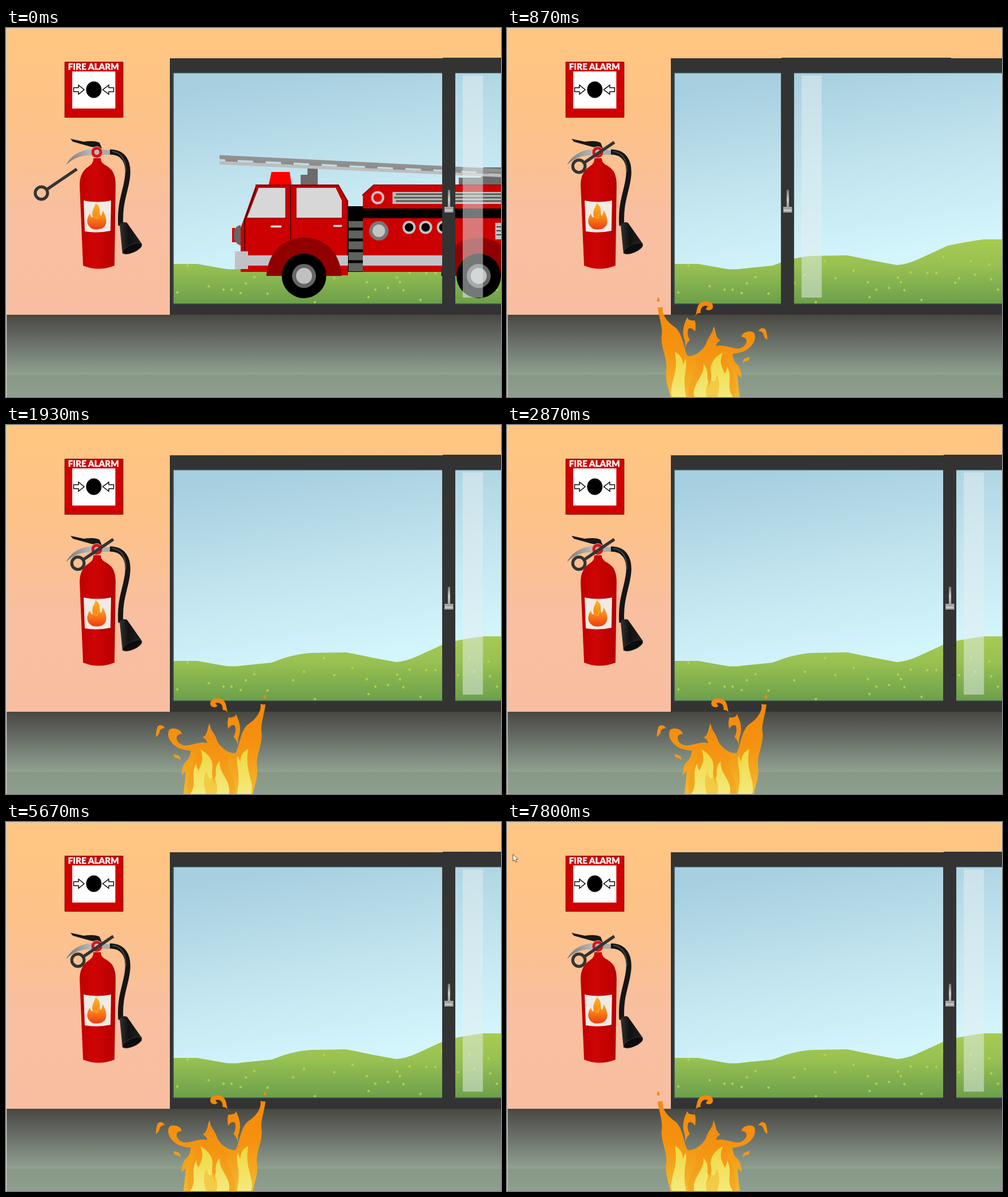
Recreate the animation shown at these times as an HTML page. Size 867 by 646 pixels, loop 8000 ms.

```html
<!DOCTYPE html>
<html lang="en">
<head>
<meta charset="utf-8">
<title>Fire alarm</title>
<style>
html, body { margin: 0; width: 100%; height: 100%; overflow: hidden; }
svg { display: block; width: 100vw; height: 100vh; }
</style>
</head>
<body>
<svg viewBox="0 0 867 646" preserveAspectRatio="none">
  <defs>
    <linearGradient id="wall" x2="0" y2="1">
      <stop offset="0" stop-color="#ffc681"/><stop offset=".32" stop-color="#fdc287"/>
      <stop offset=".65" stop-color="#f8bfa0"/><stop offset="1" stop-color="#f9bea1"/>
    </linearGradient>
    <linearGradient id="floor" x2="0" y2="1">
      <stop offset="0" stop-color="#484840"/><stop offset=".25" stop-color="#616560"/>
      <stop offset=".7" stop-color="#8c9d8c"/><stop offset=".72" stop-color="#91a291"/>
      <stop offset=".74" stop-color="#889887"/><stop offset="1" stop-color="#8f9f8f"/>
    </linearGradient>
    <linearGradient id="sky" gradientUnits="userSpaceOnUse" x1="550" y1="70" x2="610" y2="410">
      <stop offset="0" stop-color="#a7cfdf"/><stop offset=".5" stop-color="#c0e3ee"/><stop offset="1" stop-color="#d3f5fc"/>
    </linearGradient>
    <linearGradient id="grass" gradientUnits="userSpaceOnUse" x1="0" y1="370" x2="0" y2="483">
      <stop offset="0" stop-color="#a7cb52"/><stop offset=".4" stop-color="#98c152"/><stop offset="1" stop-color="#6c9f4b"/>
    </linearGradient>
    <linearGradient id="tank">
      <stop offset="0" stop-color="#c00000"/><stop offset=".4" stop-color="#cf0404"/><stop offset="1" stop-color="#b80000"/>
    </linearGradient>
    <linearGradient id="metal">
      <stop offset="0" stop-color="#777"/><stop offset=".6" stop-color="#bbb"/><stop offset="1" stop-color="#eee"/>
    </linearGradient>
    <linearGradient id="horn">
      <stop offset="0" stop-color="#333"/><stop offset=".4" stop-color="#111"/><stop offset="1" stop-color="#222"/>
    </linearGradient>
    <linearGradient id="badge" x2="0" y2="1">
      <stop offset="0" stop-color="#ffb21c"/><stop offset=".5" stop-color="#f88a1a"/><stop offset="1" stop-color="#f03a10"/>
    </linearGradient>
    <linearGradient id="lever" x2="0" y2="1">
      <stop offset="0" stop-color="#777"/><stop offset=".5" stop-color="#ccc"/><stop offset="1" stop-color="#999"/>
    </linearGradient>
    <linearGradient id="blaze" gradientUnits="userSpaceOnUse" x1="0" y1="480" x2="0" y2="646">
      <stop offset="0" stop-color="#f58709"/><stop offset=".5" stop-color="#f59310"/><stop offset="1" stop-color="#f3b92e"/>
    </linearGradient>
    <linearGradient id="core" gradientUnits="userSpaceOnUse" x1="0" y1="565" x2="0" y2="646">
      <stop offset="0" stop-color="#f0d63c"/><stop offset="1" stop-color="#f4ea7c"/>
    </linearGradient>
    <clipPath id="pane"><path d="M293 78H867V483H293Z"/></clipPath>
    <g id="wheel">
      <path d="M-66 0C-64-35-42-67 0-67S64-35 66 0Z" fill="#900000"/>
      <circle r="39"/><circle r="21" fill="#666"/><circle r="14" fill="#c0c0c0"/>
    </g>
    <g id="dial"><circle r="11.5" fill="#c4c4c4"/><circle r="7.5"/></g>
  </defs>

  <rect width="867" height="502" fill="url(#wall)"/>
  <rect y="502" width="867" height="144" fill="url(#floor)"/>

  <rect x="287" y="53" width="580" height="449" fill="#333"/>
  <g clip-path="url(#pane)">
    <rect x="293" y="78" width="574" height="405" fill="url(#sky)"/>
    <path fill="url(#grass)" d="M293 413H335L380 421Q395 424 415 421L465 416L487 408Q515 400 535 399L595 398Q602 399 640 407L683 415Q700 414 720 405L772 381Q805 374 835 370H867V483H293Z"/>
    <g id="specks" fill="#c0d64a"></g>

    <g id="truck">
      <g fill="#6b6b6b">
        <path d="M516 274V257H528V246H546V274Z"/>
        <path d="M793 274V262H832L836 244H867V274Z"/>
      </g>
      <path d="M374 236L867 258" stroke="#bdbdbd" stroke-width="6"/>
      <path d="M374 226L867 250" stroke="#919191" stroke-width="7"/>
      <path d="M384 231L867 254" stroke="#8c8c8c" stroke-width="5" stroke-dasharray="22 27"/>
      <path d="M460 275L465 252H497L500 275Z" fill="#f00"/>
      <path d="M401 350H396V375H402Z" fill="#d00"/>
      <path d="M411 345Q399 347 399 362T411 381Z" fill="#666"/>
      <path d="M438 274H582L599 303V433H560V427H411V350Z" fill="#c00"/>
      <path d="M437 275.500H582L598 303V398" fill="none" stroke="#7c0000" stroke-width="2.500"/>
      <g fill="#d7d7d7" stroke="#900" stroke-width="1.500">
        <path d="M442 279H490V333H421Z"/><path d="M508 279H578L589 302V333H508Z"/>
      </g>
      <path d="M438 280L418 337V390M498.500 277V370" fill="none" stroke="#300" stroke-width="1.500"/>
      <path d="M465 347.500H481M575 346.500H587" stroke="#ddd" stroke-width="3.500" stroke-linecap="round"/>
      <path d="M424 398H599V416H424Z" fill="#c2c2c6"/>
      <path d="M401 391H424V422H401Z" fill="#c2c2c6"/>

      <path d="M599 312H626V427H599Z"/>
      <path d="M600 338H626V426H600Z" fill="#5f635f"/>
      <path d="M600 352H626M600 371H626M600 390H626M600 409H626" stroke="#000" stroke-width="5"/>
      <path d="M644 275H867V433H790V427H625V291Z" fill="#c00"/>
      <path d="M624 293L644 275H867" fill="none" stroke="#900" stroke-width="2"/>
      <path d="M599 316H867V333H599Z"/>
      <path d="M677 287H867V308H677Z" fill="#bdbdbd"/>
      <path d="M684 291H867M681 297H867M684 303H867" stroke="#55594f" stroke-width="3" stroke-linecap="round"/>
      <circle cx="651" cy="297" r="11.500" fill="#c4c4c4"/><circle cx="651" cy="297" r="7.500" fill="#e00"/>
      <circle cx="653" cy="355" r="17" fill="#777"/><circle cx="653" cy="355" r="11" fill="#c4c4c4"/>
      <use href="#dial" x="706" y="349"/><use href="#dial" x="735" y="349"/><use href="#dial" x="766" y="349"/>
      <path d="M857 341H867V370H857Z" fill="#c4c4c4"/>
      <path d="M859 348H867M859 355H867M859 362H867" stroke="#444" stroke-width="2"/>
      <path d="M625 398H867V416H625Z" fill="#c2c2c6"/>
      <use href="#wheel" x="522" y="434"/><use href="#wheel" x="828" y="434"/>
    </g>
  </g>
  <path d="M293 483V78.500H867M293 483H867" fill="none" stroke="#39545a" stroke-width="1.500"/>

  <g id="door">
    <path d="M36 83H71.500V472H36Z" fill="#e8eff1" opacity=".5"/>
    <path d="M1 52H298V78H23V502H0V53H1Z" fill="#333"/>
    <path d="M4 313H19.500V323H4Z" fill="#a5a5a5"/>
    <path d="M10 284Q12 282 14 284V317H10Z" fill="url(#lever)"/>
    <path d="M5 319H18" stroke="#d0d0d0" stroke-width="2"/>
  </g>

  <g>
    <path d="M103 59.500H205V156.500H103Z" fill="#d10000" stroke="#7a1414"/>
    <path d="M116 76H191.500V141H116Z" fill="#fff"/>
    <text x="153.300" y="73" font-family="Lato, 'Open Sans', sans-serif" font-weight="900" font-size="15.200" fill="#fff" stroke="#fff" stroke-width=".3" text-anchor="middle">FIRE ALARM</text>
    <ellipse cx="153.800" cy="108" rx="13.500" ry="14.500"/>
    <g fill="#fff" stroke="#000" stroke-width="1.400">
      <path d="M118.500 104.500H127V100L137 108L127 116V111.500H118.500Z"/>
      <path d="M188.500 104.500H180V100L169.500 108L180 116V111.500H188.500Z"/>
    </g>
  </g>

  <g>
    <path d="M182 217C207 217 215 236 213 258C211 284 198 305 201 346" fill="none" stroke="#151515" stroke-width="9"/>
    <path d="M186 216C203 218 210 232 210 252" fill="none" stroke="#444" stroke-width="2"/>
    <path d="M199 344Q205 338 212 341L238 378Q225 396 204 395Z" fill="url(#horn)"/>
    <ellipse cx="221" cy="386" rx="18" ry="7" transform="rotate(-24 221 386)" fill="#0c0c0c" stroke="#333"/>
    <path d="M153 228H166C166 240 178 239 186 250Q192 259 192 275L190 416Q162 427 135 416L129 275Q129 258 138 248C146 240 153 240 153 228Z" fill="url(#tank)"/>
    <path d="M136 302Q160 307 184 302L183 355Q160 360 138 356Z" fill="#f1ebe4"/>
    <path d="M152 352C140 346 140 334 147 325Q149 333 152 331C149 319 155 315 157 307C168 314 162 323 166 329Q169 326 169 319C178 333 178 346 168 351Q160 354 152 352Z" fill="url(#badge)"/>
    <path d="M154 330Q157 335 160 333Q160 326 163 325" fill="none" stroke="#ffc43a"/>
    <path d="M105 240Q117 216 149 212L180 213V222L148 223Q123 222 105 240Z" fill="url(#metal)"/>
    <path d="M166 212L182 214V222H166Z" fill="#aaa"/>
    <path d="M113 194L136 199Q156 196 164 201L168 211L149 208L117 199Z" fill="#171717"/>
    <circle cx="159" cy="217.500" r="10" fill="#d41616" stroke="#e8a0a0"/>
    <circle cx="159" cy="217.500" r="4.500" fill="#c5b5b5"/>
  </g>
  <g id="pin" fill="none" stroke="#343434" stroke-width="5.200">
    <circle cx="126" cy="242" r="10.800"/><path d="M135 236L188 200"/>
  </g>

  <g id="flame" fill="url(#blaze)">
    <path d="M286 646C283 628 276 617 279 596C281 578 268 556 271 538C273 523 266 507 264 489Q270 490 273 488C270 501 281 515 293 523C307 532 308 556 316 574C328 577 345 563 349 552C353 539 360 536 362 522C367 533 364 541 374 547Q367 550 366 557C379 553 394 562 407 561C422 557 424 541 411 541C410 534 424 528 432 533C440 544 428 562 412 567Q402 570 395 570Q396 583 402 588C409 593 410 603 411 613L404 606Q405 628 408 646Z"/>
    <path d="M311 546C306 532 309 519 316 506Q316 513 329 512Q332 522 329 532Q325 524 318 526Q314 535 320 546Q314 552 312 562Q313 554 311 546Z"/>
    <path d="M327 508C335 500 329 486 341 480C351 476 364 481 360 491Q355 497 348 492L352 487C344 484 338 490 339 499Q332 498 327 508Z"/>
    <path d="M440 531Q446 522 453 528Q456 536 456 546Q450 543 449 535Q445 530 440 531Z"/>
    <path d="M262 478Q264 475 264 471Q268 474 267 479Z"/>
    <path d="M413 587Q413 579 418 578L425 576Q425 584 418 583Z"/>
    <path d="M318 646C313 620 338 600 329 579Q343 575 350 556Q359 566 368 556Q373 570 386 573C382 590 407 607 399 646Z" fill="#f28c10" opacity=".3"/>
    <path d="M352 550Q360 541 361 529Q362 543 369 548L355 551" fill="none" stroke="#d9801c"/>
    <g fill="url(#core)">
      <path d="M289 646C282 626 302 605 294 567Q308 574 308 590L313 579C317 596 306 608 314 646Z"/>
      <path d="M328 646C323 622 347 610 344 588Q353 597 351 613Q354 622 352 631Q360 616 357 602C355 586 365 575 378 568C370 588 378 594 381 605Q386 600 385 592C397 612 382 628 396 646Z"/>
    </g>
    <path d="M350 646Q345 628 356 615Q365 625 367 606Q376 622 368 646Z" fill="#f3bd30" opacity=".65"/>
  </g>

  <path id="cursor" d="M0 0V12L3 9.500L5 14L7 13L5 8.800H8.500Z" fill="#fff" stroke="#444" stroke-width=".9"/>
  <path d="M0 .5H867M.5 0V646" stroke="#d0cccb" stroke-width="1.500"/>
</svg>
<script>
const LOOP = 8000, TICK = 1000 / 15;
const $ = id => document.getElementById(id);
const show = (id, on) => $(id).setAttribute('visibility', on ? 'visible' : 'hidden');
const move = (id, x, y = 0) => $(id).setAttribute('transform', `translate(${x} ${y})`);

const specks = [318,416, 300,463, 355,452, 381,458, 395,458, 411,464, 435,436, 420,447, 458,465,
  503,447, 522,432, 541,480, 557,408, 575,438, 607,425, 632,445, 635,471, 647,458, 669,455,
  685,437, 690,445, 696,459, 707,428, 726,476, 736,429, 752,429, 764,401, 785,446, 792,438,
  812,408, 820,432, 845,414, 848,440, 860,458];
for (let i = 0; i < specks.length; i += 2) {
  const dot = document.createElementNS('http://www.w3.org/2000/svg', 'circle');
  dot.setAttribute('cx', specks[i]);
  dot.setAttribute('cy', specks[i + 1]);
  dot.setAttribute('r', 2.2);
  dot.setAttribute('opacity', .8);
  $('specks').append(dot);
}

function draw(t) {
  const tick = Math.floor((t + 5) / TICK);
  const before = tick < 3;
  show('truck', before);
  move('pin', before ? -64 : 0, before ? 47 : 0);

  // The door shuts at once, then slides open at a steady pace.
  const slide = before ? 15 : Math.min(15, Math.max(0, tick - 7));
  move('door', 290.4 + 31.57 * slide);

  // The flame mirrors itself about every 3.5 ticks.
  const flip = Math.ceil((tick - 24.55) / 3.53) - 1;
  show('flame', tick >= 7);
  $('flame').setAttribute('transform', flip % 2 ? 'translate(718.5 0) scale(-1 1)' : '');

  show('cursor', tick >= 111);
  move('cursor', tick < 112 ? 5.5 : 10.5, 56.5);
}

const start = performance.now();
function loop() {
  draw((performance.now() - start) % LOOP);
  requestAnimationFrame(loop);
}
loop();
</script>
</body>
</html>
```
